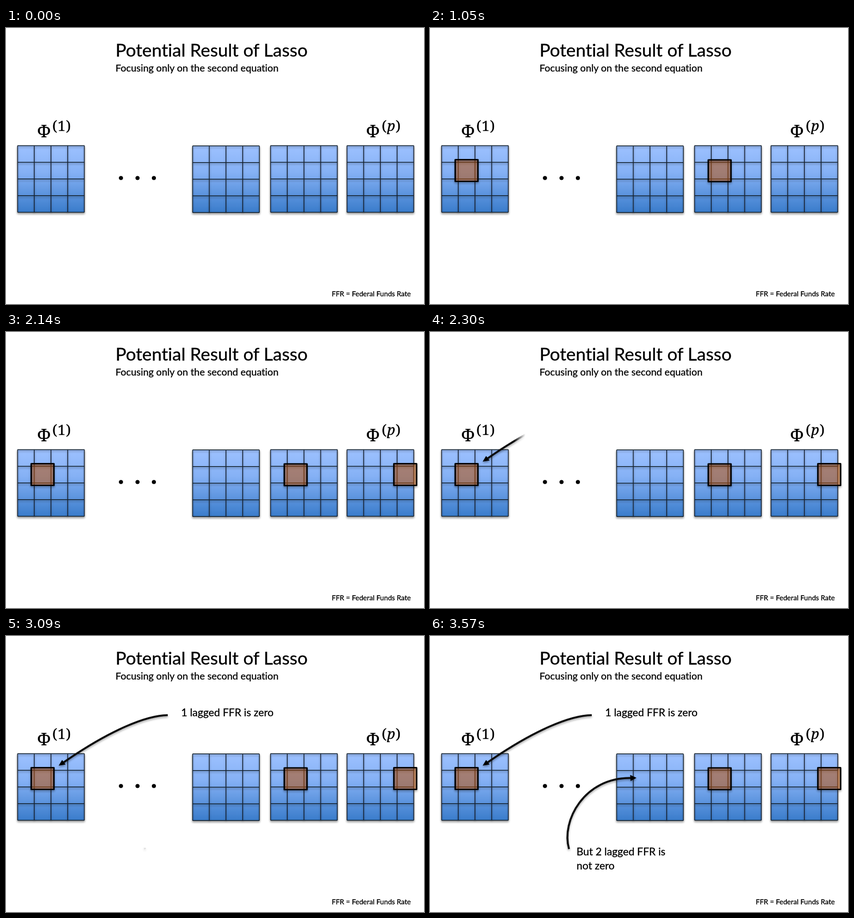
An HTML page for the animation above (8000 ms loop, 920x609 px).

```html
<!DOCTYPE html>
<html lang="en">
<head>
<meta charset="utf-8">
<title>Potential Result of Lasso</title>
<style>
  html, body { margin: 0; width: 100%; height: 100%; overflow: hidden; background: #fff; }
  svg { display: block; width: 920px; height: 609px; }
  text { font-family: Lato, sans-serif; font-variant-ligatures: none; stroke: #000; stroke-width: .35; }
  .math text { font: 38px "Noto Serif", serif; }
  .math .sup { font-size: 31px; letter-spacing: 1px; }
  .lines { fill: none; stroke: #15202f; stroke-width: 1.7; }
  .tint { fill: rgb(185 82 10 / .55); }
  .frame { fill: none; stroke: #050505; stroke-width: 3.2; stroke-linejoin: round; }
  .curve { fill: none; stroke: #080808; stroke-width: 4.2; }
</style>
</head>
<body>
<svg viewBox="0 0 920 609">
  <defs>
    <linearGradient id="blue" x2="0" y2="1">
      <stop stop-color="#9dc1ff"/>
      <stop offset=".4" stop-color="#85b1f5"/>
      <stop offset="1" stop-color="#3a7ccb"/>
    </linearGradient>
    <filter id="shadow" x="-20%" y="-20%" width="140%" height="140%">
      <feDropShadow dx="0" dy="3" stdDeviation="2" flood-opacity=".36"/>
    </filter>
    <linearGradient id="fade1" gradientUnits="userSpaceOnUse" y1="0" y2="0">
      <stop stop-color="#fff"/><stop offset="1" stop-color="#000"/>
    </linearGradient>
    <linearGradient id="fade2" gradientUnits="userSpaceOnUse" x1="0" x2="0">
      <stop stop-color="#fff"/><stop offset="1" stop-color="#000"/>
    </linearGradient>
    <mask id="wipe1" maskUnits="userSpaceOnUse" x="0" y="0" width="920" height="609">
      <rect width="920" height="609" fill="url(#fade1)"/>
    </mask>
    <mask id="wipe2" maskUnits="userSpaceOnUse" x="0" y="0" width="920" height="609">
      <rect width="920" height="609" fill="url(#fade2)"/>
    </mask>
  </defs>

  <text x="241" y="63" font-size="39.5">Potential Result of Lasso</text>
  <text x="241" y="96" font-size="21.7">Focusing only on the second equation</text>
  <text x="717" y="592" font-size="15.5">FFR = Federal Funds Rate</text>

  <g class="math">
    <text x="69" y="241">Φ</text>
    <text x="102" y="227" class="sup">(1)</text>
    <text x="793" y="241">Φ</text>
    <text x="827" y="227" class="sup">(<tspan font-style="italic">p</tspan>)</text>
  </g>

  <circle cx="253" cy="331" r="4.6"/>
  <circle cx="289.5" cy="331" r="4.6"/>
  <circle cx="325.5" cy="331" r="4.6"/>

  <g id="grids"></g>
  <g id="marks"></g>

  <g mask="url(#wipe1)">
    <g filter="url(#shadow)">
      <path class="curve" d="M356 174.6C311 175 231 206 126 279.5"/>
      <path d="M116 286L123.5 273.5L131 283.5Z"/>
    </g>
  </g>
  <g mask="url(#wipe2)">
    <g filter="url(#shadow)">
      <path class="curve" d="M306 470C288 408 340 311 443 313.5"/>
      <path d="M454.5 313L440.5 306.5L441.5 320Z"/>
    </g>
  </g>

  <text id="note1" x="385.500" y="176.500" font-size="23.2">1 lagged FFR is zero</text>
  <g id="note2" font-size="23.2">
    <text x="322.500" y="484">But 2 lagged FFR is</text>
    <text x="322.500" y="515">not zero</text>
  </g>
</svg>
<script>
const LOOP = 8000, STEP = 40, SIZE = 147;
const byId = id => document.getElementById(id);

const grid = ([x, y]) => {
  let lines = '';
  for (let i = 0; i <= 4; i++) {
    const p = i * SIZE / 4;
    lines += `M0 ${p}H${SIZE}M${p} 0V${SIZE}`;
  }
  return `<g transform="translate(${x} ${y})">
    <rect width="${SIZE}" height="${SIZE}" fill="url(#blue)" filter="url(#shadow)"/>
    <path class="lines" d="${lines}" filter="url(#shadow)"/></g>`;
};
byId('grids').innerHTML =
  [[25.5, 259.6], [410.7, 260.2], [582.3, 259.6], [750.5, 259.6]].map(grid).join('');

const marks = [
  { x: 55.5, y: 290.5, start: 550 },
  { x: 612.5, y: 291, start: 1050 },
  { x: 853.7, y: 290.5, start: 1550 },
];
byId('marks').innerHTML = marks.map(({ x, y }) => {
  const box = `x="${x}" y="${y}" width="50" height="48"`;
  return `<g><rect class="tint" ${box}/><rect class="frame" ${box} filter="url(#shadow)"/></g>`;
}).join('');

const show = (element, visible) =>
  element.setAttribute('visibility', visible ? 'visible' : 'hidden');

// Places the soft edge of a wipe: opaque at "from", clear at "to".
const setEdge = (id, axis, from, to) => {
  byId(id).setAttribute(axis + '1', from);
  byId(id).setAttribute(axis + '2', to);
};

// Time since start in whole steps, negative before the start.
const stepped = (t, start) => Math.floor((t - start) / STEP) * STEP;

function draw(t) {
  marks.forEach((mark, i) => show(byId('marks').children[i], t >= mark.start));

  const u = stepped(t, 2140);
  const right = u < 0 ? 0 : u >= 400 ? 500 : 118 + 92 * (u / 160) ** 1.2;
  setEdge('fade1', 'x', right - 25, right);
  show(byId('note1'), t >= 2540);

  const v = stepped(t, 3090);
  const top = v < 0 ? 609 : v >= 480 ? 200 : 466 - 103 * v / 240;
  setEdge('fade2', 'y', top + 22, top);
  show(byId('note2'), t >= 3570);
}

const origin = performance.now();
function tick() {
  draw((performance.now() - origin) % LOOP);
  requestAnimationFrame(tick);
}
tick();
</script>
</body>
</html>
```
